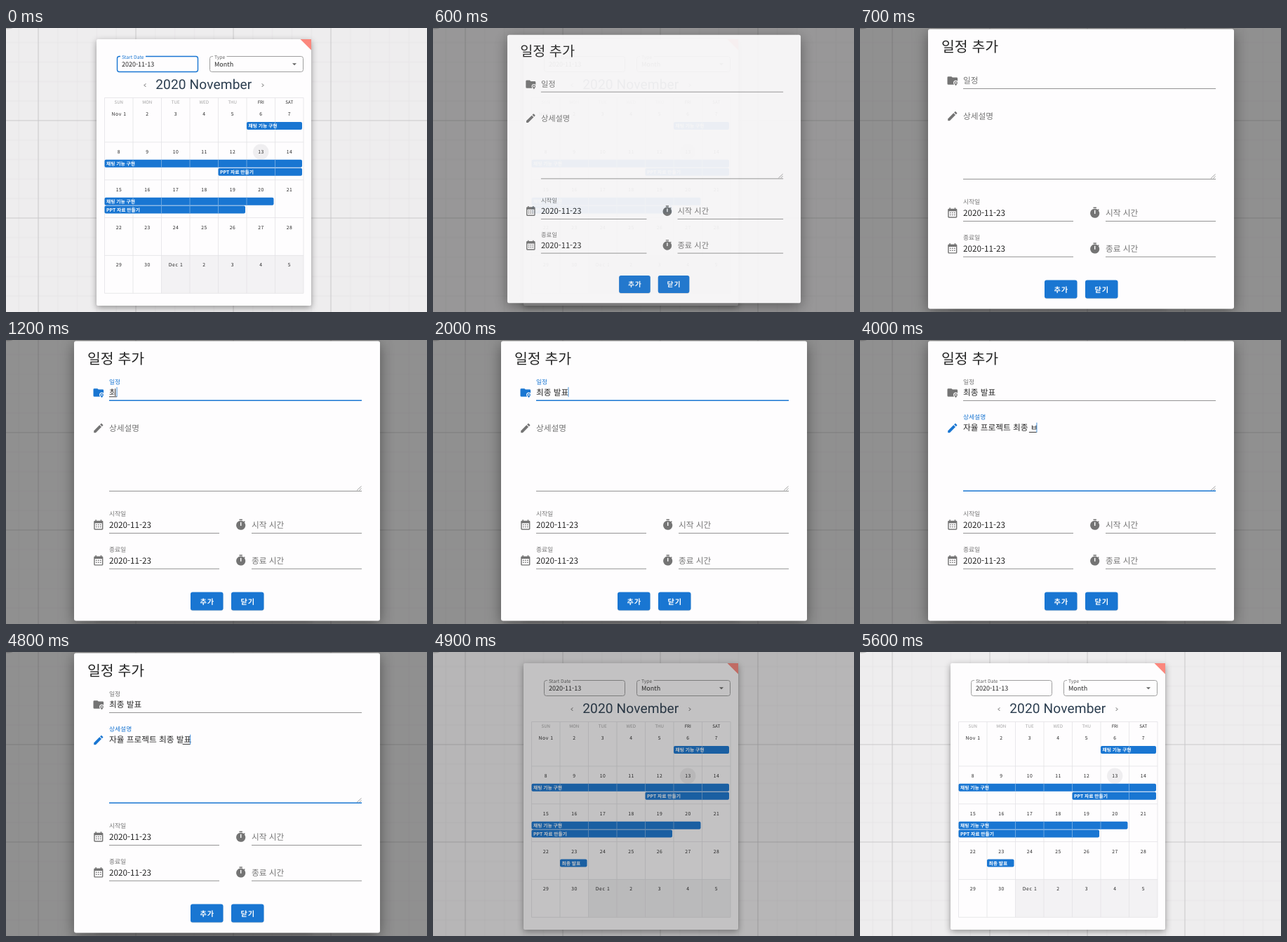
Recreate the animation shown at these times as an HTML page. Size 600x405 px, loop 5800 ms.

```html
<!DOCTYPE html>
<html lang="ko">
<head>
<meta charset="utf-8">
<title>Calendar</title>
<style>
  html, body { margin: 0; width: 100%; height: 100%; overflow: hidden; background: #eeedee; }
  svg { display: block; width: 600px; height: 405px; }
  text { font-family: "Noto Sans CJK KR", "Noto Sans CJK", "Noto Sans", sans-serif; white-space: pre; text-rendering: geometricPrecision; }
  .heading { font-family: Roboto, sans-serif; letter-spacing: .0073em; }
  .day { font-weight: 500; letter-spacing: .6px; }
  .button { font-weight: 700; letter-spacing: .9px; }
  .card { filter: drop-shadow(0 3px 5px rgba(0, 0, 0, .38)); }
  .dialog { filter: drop-shadow(0 5px 10px rgba(0, 0, 0, .42)); }
</style>
</head>
<body>
<svg viewBox="0 0 600 405"></svg>
<script>
const LOOP = 5800, STEP = 100;
const FONT = '"Noto Sans CJK KR", "Noto Sans CJK", "Noto Sans", sans-serif';
const BLUE = '#1976d2', INK = '#252525', GREY = '#747474', LINE = '#949494', PAPER = '#fefdfe';
const svg = document.querySelector('svg');
const ruler = document.createElement('canvas').getContext('2d');

const ease = x => 1 - (1 - Math.min(1, Math.max(0, x))) ** 3;
const lerp = (a, b, p) => a + (b - a) * p;
const mix = (from, to, p) => '#' + [1, 3, 5].map(i => {
  const [a, b] = [from, to].map(c => parseInt(c.slice(i, i + 2), 16));
  return Math.round(lerp(a, b, p)).toString(16).padStart(2, '0');
}).join('');

const text = (x, y, size, content, fill = INK, attrs = '') =>
  `<text x="${x}" y="${y}" font-size="${size}" fill="${fill}" ${attrs}>${content}</text>`;
const rect = (x, y, w, h, fill, attrs = '') =>
  `<rect x="${x}" y="${y}" width="${w}" height="${h}" fill="${fill}" ${attrs}/>`;
const path = (d, stroke, width = 1) =>
  `<path d="${d}" fill="none" stroke="${stroke}" stroke-width="${width}"/>`;

// Background grid
const grid = [0, 1, 2, 3, 4].map(i => {
  const p = i * 27.8 + .5;
  return path(`M${p} 0V139M0 ${p}H139`, i ? '#e4e3e5' : '#c9c8ca', i ? .8 : 1.1);
}).reverse().join('');
const backdrop = `<defs>
  <pattern id="grid" x="45.5" y="131.5" width="139" height="139" patternUnits="userSpaceOnUse">${grid}</pattern>
  </defs>` + rect(0, 0, 600, 405, '#eeedee') + rect(0, 0, 600, 405, 'url(#grid)') +
  '<ellipse cx="3" cy="-1" rx="7" ry="2.5" fill="#aaa" opacity=".7"/>';

// Calendar
const LEFT = 140.5, COL = 40.5, TOP = 109, ROW = 53.85;
const columnX = c => LEFT + c * COL;
const rowY = r => TOP + r * ROW;

function calendarEvent(row, from, to, slot, title) {
  const x = columnX(from), y = rowY(row) + 25 + slot * 11.8, w = (to - from) * COL - 2;
  let seams = '';
  for (let c = from + 1; c < to; c++) seams += `M${columnX(c)} ${y}v11`;
  return rect(x, y, w, 11, BLUE, 'rx="2"') + path(seams, '#8fbce8', .7) +
    text(x + 2.5, y + 8, 6.75, title, '#fff', 'font-weight="700"');
}

function outlinedField(x, w, label, labelWidth, value, focus) {
  const color = mix('#9e9e9e', BLUE, focus);
  return rect(x, 40.5, w, 22, 'none', `rx="3" stroke="${color}" stroke-width="${1 + focus * .4}"`) +
    rect(x + 4.5, 39, labelWidth + 4, 3, PAPER) +
    text(x + 6.5, 44.3, 6.75, label, mix('#666666', BLUE, focus)) +
    text(x + 6.5, 55.2, 9, value);
}

const weekdays = ['SUN', 'MON', 'TUE', 'WED', 'THU', 'FRI', 'SAT'].map((name, c) =>
  text(columnX(c + .5), 107.6, 6.2, name, c < 5 ? '#a2a2a2' : INK, 'text-anchor="middle"')).join('');

const days = Array.from({ length: 35 }, (_, i) => {
  const month = { 0: 'Nov ', 30: 'Dec ' }[i] || '';
  return text(columnX(i % 7 + .5) + .3, rowY(i / 7 | 0) + 16, 6.75, month + (i % 30 + 1),
    INK, 'class="day" text-anchor="middle"');
}).join('');

let rules = `M${LEFT} 99.5H${columnX(7)}`;
for (let c = 0; c <= 7; c++) rules += `M${columnX(c)} 99.5V${rowY(5)}`;
for (let r = 1; r <= 5; r++) rules += `M${LEFT} ${rowY(r)}H${columnX(7)}`;

const month = rect(columnX(2), rowY(4), COL * 5, ROW, '#f3f2f4') + path(rules, '#e4e3e6', .8) +
  `<circle cx="363.2" cy="176.6" r="11.2" fill="#efeef0"/>` + weekdays + days +
  calendarEvent(0, 5, 7, 0, '채팅 기능 구현') +
  calendarEvent(1, 0, 7, 0, '채팅 기능 구현') +
  calendarEvent(1, 4, 7, 1, 'PPT 자료 만들기') +
  calendarEvent(2, 0, 6, 0, '채팅 기능 구현') +
  calendarEvent(2, 0, 5, 1, 'PPT 자료 만들기');

const sheet = rect(129, 16, 306, 380, PAPER, 'rx="2" class="card"') +
  '<path d="M419.5 16H435V31.5z" fill="#fb877d"/>' +
  '<path d="M408 50.3h6l-3 3z" fill="#666"/>' +
  path('M199.2 79.4l-2.2 2.2 2.2 2.2M364.8 79.4l2.2 2.2-2.2 2.2', '#444', .9) +
  text(213.2, 87.4, 19.125, '2020 November', '#2c3e50', 'class="heading"') + month;

const calendar = (focus, added) => sheet +
  outlinedField(158.5, 115, 'Start Date', 32, '2020-11-13', focus) +
  outlinedField(290.5, 133, 'Type', 15.5, 'Month', 0) +
  (added ? calendarEvent(3, 1, 2, 0, '최종 발표') : '');

// Dialog
const ICONS = {
  folder: `<path d="M10 4H4a2 2 0 0 0-2 2v12a2 2 0 0 0 2 2h16a2 2 0 0 0 2-2V8a2 2 0 0 0-2-2h-8z"/>
    <path d="M18.5 23.5c-2-2.6-4-4.800-4-7a4 4 0 0 1 8 0c0 2.200-2 4.400-4 7z" stroke="${PAPER}" stroke-width="1.6"/>
    <circle cx="18.500" cy="16.500" r="1.500" fill="${PAPER}"/>`,
  pencil: `<path d="M20.7 7c.4-.4.4-1 0-1.400l-2.300-2.300c-.4-.4-1-.4-1.400 0l-1.900 1.800 3.800 3.800zM3 17.250V21h3.750L17.800 9.900 14.060 6.200z"/>`,
  calendar: `<path fill-rule="evenodd" d="M19 4h-1V2h-2v2H8V2H6v2H5a2 2 0 0 0-2 2v14a2 2 0 0 0 2 2h14a2 2 0 0 0 2-2V6a2 2 0 0 0-2-2zm0 16H5V9h14z"/>
    <path d="M7 11h2v2H7zm4 0h2v2h-2zm4 0h2v2h-2zM7 15h2v2H7zm4 0h2v2h-2zm4 0h2v2h-2z"/>`,
  timer: `<path fill-rule="evenodd" d="M19 7.400l1.400-1.400-1.400-1.400L17.600 6A9 9 0 1 0 19 7.400zM13 14h-2V7h2zM15 1H9v2h6z"/>`
};
const icon = (name, cx, cy, fill = GREY) =>
  `<g transform="translate(${cx - 8.76} ${cy - 8.76}) scale(.73)" fill="${fill}">${ICONS[name]}</g>`;

const SIZE = 11.7, SMALL = 8.75, FIELD_X = 147, FIELD_W = 360;

function editableField({ iconName, label, y, lineY, value, focus, float, composing }) {
  const color = mix(GREY, BLUE, focus), half = FIELD_W / 2 * focus, mid = FIELD_X + FIELD_W / 2;
  ruler.font = `${SIZE}px ${FONT}`;
  const end = FIELD_X + ruler.measureText(value).width;
  let out = icon(iconName, 131.8, y - 4.2, color) +
    path(`M${FIELD_X} ${lineY}h${FIELD_W}`, LINE) +
    text(FIELD_X, lerp(y, y - 16.400, float), lerp(SIZE, SMALL, float), label, color) +
    text(FIELD_X, y - .7, SIZE, value);
  if (focus > 0) out += path(`M${mid - half} ${lineY - .3}h${half * 2}`, BLUE, 1.5);
  if (focus > .5) {
    out += path(`M${end + .3} ${y - 12}v14`, BLUE, .8);
    if (composing && value && !value.endsWith(' '))
      out += path(`M${end - SIZE * .92} ${y + 1.700}H${end}`, INK, .9);
  }
  return out;
}

const dateRow = (y, label, timeLabel) =>
  icon('calendar', 131.8, y - 4.7) + text(147, y - 16.8, SMALL, label, GREY) + text(147, y, SIZE, '2020-11-23') +
  icon('timer', 334.7, y - 4.7) + text(350, y, SIZE, timeLabel, GREY) +
  path(`M147 ${y + 7.300}h157M350 ${y + 7.300}h157`, LINE);

const button = (x, label) => rect(x, 360.3, 46.5, 26, '#000', 'rx="3" opacity=".15"') +
  rect(x, 359.5, 46.5, 26, BLUE, 'rx="3"') +
  text(x + 23.7, 376.5, 10.2, label, '#fff', 'class="button" text-anchor="middle"');

const dialogBase = rect(97, 1.5, 436, 399, PAPER, 'rx="3" class="dialog"') +
  text(116, 33.600, 20.5, '일정 추가', INK, 'font-weight="300"') +
  dateRow(268.2, '시작일', '시작 시간') + dateRow(319, '종료일', '종료 시간') +
  button(263, '추가') + button(321, '닫기') +
  path('M500 214.5l6.5-6M503.500 214.5l3-3', '#888', .8);

// Every intermediate state while typing Hangul: lead, lead + vowel, full syllable
const LEADS = 'ㄱㄲㄴㄷㄸㄹㅁㅂㅃㅅㅆㅇㅈㅉㅊㅋㅌㅍㅎ';
const keystrokes = phrase => ['', ...[...phrase].flatMap((ch, i) => {
  const head = phrase.slice(0, i), code = ch.charCodeAt(0) - 0xac00;
  if (code < 0) return [head + ch];
  const open = String.fromCharCode(0xac00 + code - code % 28);
  return [...new Set([LEADS[code / 588 | 0], open, ch])].map(s => head + s);
})];
const typed = (states, n) => states[Math.max(0, Math.min(states.length - 1, Math.floor(n)))];
const titleStates = keystrokes('최종 발표');
const detailStates = keystrokes('자율 프로젝트 최종 발표');

function dialog(t) {
  const titleIn = ease((t - 800) / 300), detailIn = ease((t - 2300) / 300);
  const detailKeys = t < 3500 ? Math.min(16, (t - 2600) / 50) : 16 + (t - 3500) * 11 / 700;
  return dialogBase +
    editableField({
      iconName: 'folder', label: '일정', y: 79.200, lineY: 86.5, focus: titleIn - detailIn, float: titleIn,
      value: typed(titleStates, (t - 1000) / 80), composing: t < 2000
    }) +
    editableField({
      iconName: 'pencil', label: '상세설명', y: 129.800, lineY: 215.5, focus: detailIn, float: detailIn,
      value: typed(detailStates, detailKeys), composing: true
    });
}

function scene(t) {
  const shown = ease((t - 470) / 230), closing = Math.min(1, Math.max(0, (t - 4820) / 190));
  const dim = .46 * shown * (1 - closing);
  let out = backdrop + calendar(1 - ease((t - 50) / 250), t >= 4900);
  if (dim > 0) out += rect(0, 0, 600, 405, '#212121', `opacity="${dim}"`);
  if (shown > 0 && t < 4900) {
    const scale = lerp(.5, 1, shown);
    out += `<g opacity="${shown}" transform="translate(315 201) scale(${scale}) translate(-315 -201)">${dialog(t)}</g>`;
  }
  return out;
}

let last = -1;
function tick() {
  const t = Math.floor(performance.now() % LOOP / STEP) * STEP;
  if (t !== last) svg.innerHTML = scene(last = t);
  requestAnimationFrame(tick);
}
tick();
</script>
</body>
</html>
```
